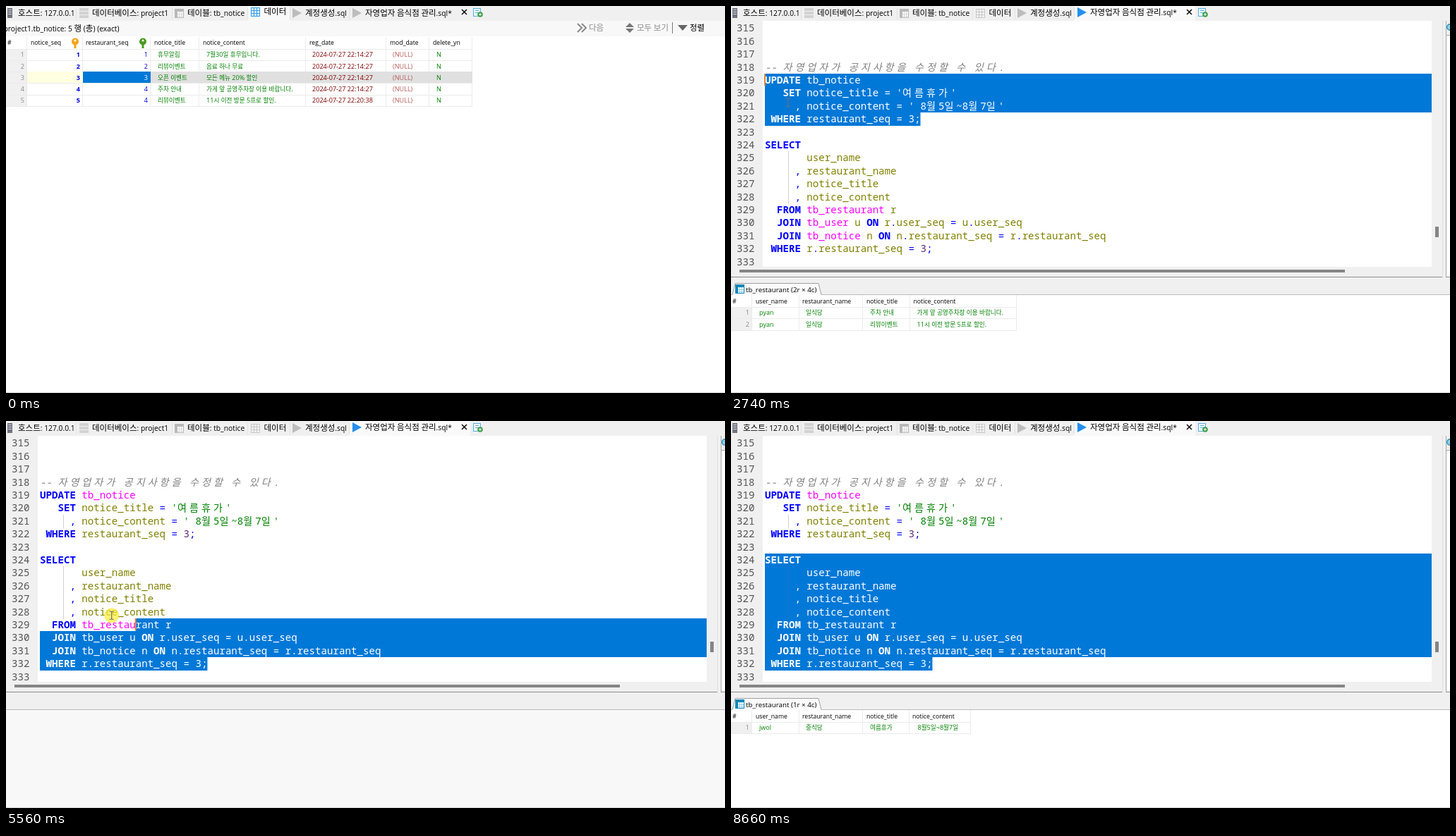
These frames come from a looping animation (1019x549 px, 9060 ms). An HTML page with a canvas:

```html
<!DOCTYPE html>
<html lang="ko">
<head>
<meta charset="utf-8">
<title>SQL client</title>
<style>
html, body { margin: 0; height: 100%; overflow: hidden; background: #fff; }
canvas { display: block; }
</style>
</head>
<body>
<canvas id="stage" width="1019" height="549"></canvas>
<script>
const g = document.getElementById('stage').getContext('2d');
const LOOP = 9060, CHAR = 8.48, ROW = 18.4, LEFT = 48, FIRST = 315;
const BLUE = '#0078d7', GREEN = '#008000', GRAY = '#f0f0f0';
const CODE = `


-- 자영업자가 공지사항을 수정할 수 있다.
UPDATE tb_notice
   SET notice_title = '여름휴가'
     , notice_content = ' 8월5일~8월7일'
 WHERE restaurant_seq = 3;

SELECT
       user_name
     , restaurant_name
     , notice_title
     , notice_content
  FROM tb_restaurant r
  JOIN tb_user u ON r.user_seq = u.user_seq
  JOIN tb_notice n ON n.restaurant_seq = r.restaurant_seq
 WHERE r.restaurant_seq = 3;
`.split('\n');

const TOKEN = /(--.*)|('.*')|\b(UPDATE|SET|WHERE|SELECT|FROM|JOIN|ON)\b|(tb_\w+)|(\d+)|(\w+)|(\S)|\s+/g;
const COLORS = ['#000', '#808080', GREEN, '#0000ff', '#ff00ff', '#602a78', '#808000', '#0000ff'];

// Pointer path: time, x, y
const PATH = [
  [130, 548, 175], [650, 583, 14], [1030, 582, 10], [1080, 575, 18], [1480, 272, 160],
  [1600, 270, 160], [1780, 190, 156], [1950, 42, 131], [2020, 28, 128], [2200, 16, 112],
  [2350, 14, 106], [2450, 18, 108], [2740, 81, 137], [4610, 81, 137], [5000, 290, 345],
  [5290, 286, 345], [5380, 260, 345], [5415, 260, 342], [5430, 236, 325], [5460, 234, 323],
  [5490, 195, 292], [5560, 150, 276], [5910, 36, 203], [6060, 36, 203], [6170, 39, 183],
  [7770, 39, 183], [8110, 330, 412]
];
const DRAGS = [
  { from: 1560, to: 2400, line: 322, col: 26, blink: 3000 },
  { from: 5080, to: 6060, line: 332, col: 28, blink: 6500 }
];
const SWITCH = 850, CLEAR = 3880, RESULT = 6970;

const clamp = (v, a, b) => Math.max(a, Math.min(b, v));
const lineTop = n => Math.round(96 + (n - 319) * ROW);
const isWide = c => /[가-힣]/.test(c);

function rect(x, y, w, h, color) {
  g.fillStyle = color;
  g.fillRect(x, y, w, h);
}

function poly(color, ...p) {
  g.fillStyle = color;
  g.beginPath();
  for (let i = 0; i < p.length; i += 2) g.lineTo(p[i], p[i + 1]);
  g.closePath();
  g.fill();
}

function stroke(color, width, ...p) {
  g.strokeStyle = color;
  g.lineWidth = width;
  g.beginPath();
  for (let i = 0; i < p.length; i += 2) g.lineTo(p[i], p[i + 1]);
  g.stroke();
}

function disc(x, y, r, color) {
  g.fillStyle = color;
  g.beginPath();
  g.arc(x, y, r, 0, 7);
  g.fill();
}

// Interface text; Korean runs get their own size. y is the middle of the line.
function label(text, x, y, color = '#000', size = 10.3, ko = 11.5, weight = 400, right = false) {
  const runs = text.match(/[가-힣]+|[^가-힣]+/g).map(s => {
    const font = isWide(s[0]) ? `${weight} ${ko}px "Noto Sans CJK KR", sans-serif`
                              : `${weight} ${size}px "Open Sans", "Noto Sans", sans-serif`;
    g.font = font;
    return { s, font, w: g.measureText(s).width };
  });
  if (right) x -= runs.reduce((sum, r) => sum + r.w, 0);
  g.fillStyle = color;
  for (const r of runs) {
    g.font = r.font;
    g.fillText(r.s, x, y + size * .36);
    x += r.w;
  }
}
const cell = (text, x, y, color, weight, right) => label(text, x, y, color, 9.1, 8.6, weight, right);
const head = (text, x, y) => label(text, x, y, '#000', 8.7, 8.6);

function gridIcon(x, y, color, back) {
  rect(x, y, 13, 13, color);
  for (let i = 0; i < 9; i++) rect(x + 1 + i % 3 * 4, y + 1 + (i / 3 | 0) * 4, 3, 3, back);
}

function tableIcon(x, y, color, light) {
  rect(x, y, 13, 13, color);
  rect(x + 4, y + 4, 8, 8, '#fff');
  for (let i = 0; i < 2; i++) {
    rect(x + 4, y + 7 + i * 3, 8, 1, light);
    rect(x + 6 + i * 3, y + 4, 1, 8, light);
  }
}

function drawTabs(dataOn) {
  rect(0, 0, 1019, 21, GRAY);
  if (dataOn) rect(342, 0, 60, 21, '#f9f9f9');
  else rect(486, 0, 172, 21, '#f9f9f9');
  for (const x of [99, 235, 342, 402, 486]) rect(x, 2, 1, 17, '#e2e2e2');
  rect(2, 3, 7, 14, '#73737f');
  for (const y of [5, 8, 11]) rect(3, y, 5, 1, '#d8d8e0');
  label('호스트: 127.0.0.1', 17, 10);
  for (const y of [3, 8, 13]) rect(104, y, 13, 4, '#d2d2d2');
  label('데이터베이스: project1', 122, 10);
  tableIcon(239, 4, '#b8b8b8', '#d8d8d8');
  label('테이블: tb_notice', 257, 10);
  gridIcon(347, dataOn ? 2 : 4, dataOn ? '#2f9be8' : '#c8c8c8', dataOn ? '#e4f4ff' : '#f2f2f2');
  label('데이터', 365.5, dataOn ? 8.5 : 10);
  poly('#bdbdbd', 406, 3, 419, 10, 406, 17);
  label('계정생성.sql', 424, 10);
  const dy = dataOn ? 0 : -1;
  poly(dataOn ? '#bdbdbd' : '#2490ee', 491, 3 + dy, 504, 10 + dy, 491, 17 + dy);
  label('자영업자 음식점 관리.sql*', 509, 10 + dy);
  stroke('#111', 1.6, 646, 5, 653, 12);
  stroke('#111', 1.6, 653, 5, 646, 12);
  rect(662, 3, 11, 12, '#58aede');
  rect(663, 4, 9, 10, '#eef8ff');
  for (const y of [6, 9]) rect(665, y, 5, 1, '#58aede');
  disc(672, 12, 3.8, '#3f9f4a');
  rect(670, 11.5, 4, 1, '#fff');
  rect(671.5, 10, 1, 4, '#fff');
}

function key(x, color) {
  disc(x, 50.5, 5, color);
  rect(x - 1.5, 53, 3, 7, color);
  disc(x, 49, 1.5, '#fff');
}

// Grid frame: column edges plus horizontal rules
function gridFrame(cols, ys) {
  const right = cols[cols.length - 1], bottom = ys[ys.length - 1];
  rect(0, ys[0], 30, bottom - ys[0], GRAY);
  for (const y of ys) rect(0, y, right, 1, '#ebebeb');
  for (const x of cols) rect(x - 1, ys[0] - 17, 1, bottom - ys[0] + 17, '#ebebeb');
}

function drawData() {
  rect(0, 21, 1019, 22, '#f8f8f8');
  rect(0, 43, 1019, 505, '#fff');
  label('project1.tb_notice: 5 행 (총) (exact)', -3.5, 32);
  for (const x of [810, 816]) stroke('#8a8a8a', 2, x, 25, x + 6, 31, x, 37);
  label('다음', 826, 31, '#8c8c8c');
  poly('#777', 878, 30, 884, 24, 890, 30);
  poly('#777', 878, 32, 884, 38, 890, 32);
  label('모두 보기', 894, 31, '#8c8c8c');
  rect(944, 23, 1, 16, '#777');
  poly('#666', 952, 27, 966, 27, 959, 35);
  label('정렬', 969, 31);

  gridFrame([30, 109, 205, 274, 425, 539, 600, 661], [61, 77, 93, 109, 126, 142]);
  rect(30, 93, 79, 16, '#ffffe1');
  rect(109, 93, 96, 16, BLUE);
  rect(205, 93, 456, 16, '#e0e0e0');
  const names = ['#', 'notice_seq', 'restaurant_seq', 'notice_title', 'notice_content', 'reg_date', 'mod_date', 'delete_yn'];
  [2, 35, 113, 210, 279, 430, 544, 605].forEach((x, i) => head(names[i], x, 52));
  key(98, '#f5a31a');
  key(194, '#4c9a20');
  const rows = [
    ['휴무알림', '7월30일 휴무입니다.'], ['리뷰이벤트', '음료 하나 무료'],
    ['오픈 이벤트', '모든 메뉴 20% 할인'], ['주차 안내', '가게 앞 공영주차장 이용 바랍니다.'],
    ['리뷰이벤트', '11시 이전 방문 5프로 할인.']
  ];
  rows.forEach(([title, text], i) => {
    const y = 69 + i * 16.25, n = String(i + 1);
    cell(n, 26, y, '#8a8a8a', 400, true);
    cell(n, 105, y, '#0000e0', 700, true);
    cell(i < 4 ? n : '4', 201, y, i === 2 ? '#fff' : '#0000e0', 400, true);
    cell(title, 215, y, GREEN);
    cell(text, 284, y, GREEN);
    cell('2024-07-27 22:' + (i < 4 ? '14:27' : '20:38'), 434, y, '#800000');
    cell('(NULL)', 548, y, '#b85c5c');
    cell('N', 610, y, GREEN);
  });
}

function pointer(t) {
  if (t < PATH[0][0] || t >= PATH[PATH.length - 1][0]) return null;
  const i = PATH.findIndex(p => p[0] > t), a = PATH[i - 1], b = PATH[i];
  const k = (t - a[0]) / (b[0] - a[0]);
  return { x: a[1] + (b[1] - a[1]) * k, y: a[2] + (b[2] - a[2]) * k };
}

// The selection trails the pointer slightly while dragging
function selection(t) {
  const d = DRAGS.filter(d => t >= d.from).pop();
  if (!d) return null;
  const p = pointer(clamp(t - 50, d.from, d.to));
  const line = clamp(319 + Math.floor((p.y - 96) / ROW), 319, d.line);
  const most = line === d.line ? d.col : CODE[line - FIRST].length;
  const col = clamp(Math.round((p.x - LEFT) / CHAR), 0, most);
  const off = t >= d.blink && (t - d.blink) % 1075 < 538;
  return { line, col, end: d.line, endCol: d.col, caret: !off };
}

function drawCode(sel) {
  const mono = '14.13px "Noto Sans Mono", "Noto Sans CJK KR", monospace';
  for (let i = 0; i < 19; i++) {
    const n = FIRST + i, top = lineTop(n), base = top + 14.3;
    const inside = sel && n >= sel.line && n <= sel.end;
    const from = inside && n === sel.line ? sel.col : 0;
    const to = inside && n === sel.end ? sel.endCol : 999;
    g.font = mono;
    g.fillStyle = '#555';
    g.fillText(n, 8, base);
    if (inside) {
      const x = LEFT + from * CHAR;
      rect(x, top, Math.min(993, LEFT + to * CHAR) - x, lineTop(n + 1) - top, BLUE);
    }
    if (n === 321 || n > 324 && n < 329) rect(81, top, 1, ROW + 1, inside ? '#1a6fc0' : '#d0d0d0');
    let col = 0;
    for (const m of (CODE[i] || '').matchAll(TOKEN)) {
      const kind = m.slice(1).findIndex(Boolean) + 1;
      g.font = (kind === 1 ? 'italic ' : kind === 3 ? 'bold ' : '') + mono;
      for (const c of m[0]) {
        g.fillStyle = inside && col >= from && col < to ? '#fff' : COLORS[kind];
        g.fillText(c, LEFT + col * CHAR, base);
        col += isWide(c) ? 2 : 1;
      }
    }
  }
  if (sel && sel.caret) rect(LEFT + sel.col * CHAR - 1, lineTop(sel.line), 2, 17, '#d98a3c');
}

function drawResult(t) {
  rect(0, 386, 1019, 23, GRAY);
  rect(0, 409, 1019, 139, '#f8f8f8');
  rect(0, 409, 1019, 1, '#bcbcbc');
  if (t >= CLEAR && t < RESULT) return;
  const late = t >= RESULT;
  const rows = late ? [['jwol', '중식당', '여름휴가', '8월5일~8월7일']] : [
    ['pyan', '일식당', '주차 안내', '가게 앞 공영주차장 이용 바랍니다.'],
    ['pyan', '일식당', '리뷰이벤트', '11시 이전 방문 5프로 할인.']
  ];
  rect(0, 410, 1019, 138, '#fff');
  poly('#fbfbfb', 2, 410, 6, 393, 124, 393, 128, 410);
  stroke('#a0a0a0', 1, 2, 409.5, 6, 393.5, 124, 393.5, 128, 409.5);
  tableIcon(6, 395, '#1287b8', '#8fd0ea');
  label(`tb_restaurant (${rows.length}r × 4c)`, 21, 402.5, '#000', 9.8);
  gridFrame(late ? [30, 97, 187, 253, 340] : [30, 97, 187, 254, 405], late ? [427, 443] : [427, 443, 460]);
  const names = ['#', 'user_name', 'restaurant_name', 'notice_title', 'notice_content'];
  [2, 35, 101, 192, late ? 257 : 258.5].forEach((x, i) => head(names[i], x, 419));
  rows.forEach((row, r) => {
    const y = 435 + r * 16.3;
    cell(String(r + 1), 26, y, '#8a8a8a', 400, true);
    [40, 106, 197, late ? 264.5 : 263.5].forEach((x, i) => cell(row[i], x, y, GREEN));
  });
}

function drawEditor(t) {
  rect(0, 21, 1019, 527, GRAY);
  rect(45, 21, 948, 349, '#fff');
  g.save();
  g.beginPath();
  g.rect(0, 21, 993, 349);
  g.clip();
  drawCode(selection(t));
  g.restore();
  rect(998, 313, 5, 15, '#858585');
  rect(12, 374, 858, 4, '#858585');
  rect(0, 384, 1009, 1, '#8c8c8c');
  rect(1008, 21, 1, 364, '#e0e0e0');
  rect(1013, 41, 6, 343, '#fff');
  rect(1013, 21, 1, 364, '#a8a8a8');
  rect(1013, 41, 6, 1, '#a8a8a8');
  rect(1013, 384, 6, 1, '#8c8c8c');
  disc(1019, 30, 5, '#2f93b8');
  disc(1019, 30, 3.5, '#8fd0ea');
  drawResult(t);
}

function drawPointer(t) {
  const p = pointer(t);
  if (!p) return;
  const { x, y } = p, dragging = DRAGS.some(d => t >= d.from && t < d.to);
  if (dragging || t > 740 && t < SWITCH) disc(x, y, 10.5, 'rgba(255,236,50,.7)');
  if (dragging || t > SWITCH && x > 45 && y > 21 && y < 370) {
    stroke('#6b7078', 1, x - 3, y - 5.5, x + 3, y - 5.5);
    stroke('#6b7078', 1, x - 3, y + 5.5, x + 3, y + 5.5);
    stroke('#6b7078', 1.2, x, y - 5.5, x, y + 5.5);
    return;
  }
  const shape = [0, 0, 0, 11.5, 2.7, 9, 4.6, 13, 6.4, 12.2, 4.6, 8.3, 8, 8.2, 0, 0]
    .map((v, i) => v + (i % 2 ? y : x));
  poly('#fff', ...shape);
  stroke('#222', 1, ...shape);
}

function draw(now) {
  const t = now % LOOP;
  const dataOn = t < SWITCH;
  if (dataOn) drawData();
  else drawEditor(t);
  drawTabs(dataOn);
  rect(0, 548, 1019, 1, '#d4d4d4');
  drawPointer(t);
}

const start = performance.now();
function tick() {
  draw(performance.now() - start);
  requestAnimationFrame(tick);
}
tick();
</script>
</body>
</html>
```
